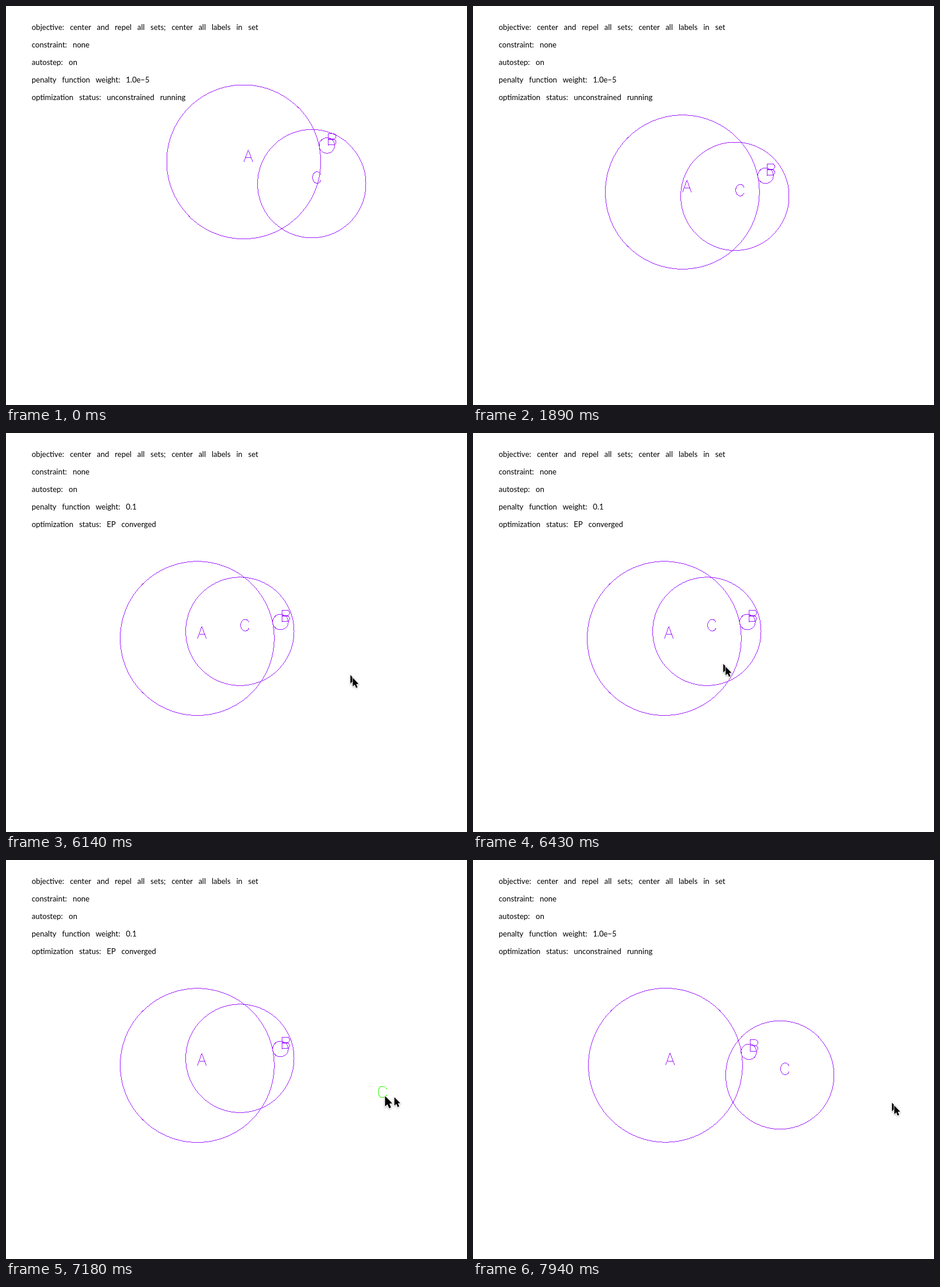
An HTML page with a canvas for the animation above (8000 ms loop, 789 px wide and 683 px high).

```html
<!DOCTYPE html>
<html lang="en">
<head>
<meta charset="utf-8">
<title>Set layout optimization</title>
<style>
  html, body { margin: 0; width: 100%; height: 100%; overflow: hidden; background: #fff; }
  canvas { position: absolute; left: 0; top: 0; }
  #status {
    position: absolute; left: 44px; top: 21px;
    font: 13px/30px Lato, sans-serif; color: #000;
    word-spacing: 6.6px; white-space: pre;
  }
</style>
</head>
<body>
<canvas id="stage" width="789" height="683"></canvas>
<div id="status"></div>
<script>
const LOOP = 8000, STEP = 58, RELAX = 7470;
const CONVERGED = 5370, ENTER = 5962, ARRIVE = 6542, GRAB = 6716, DROP = 7354, REST = 7586;
const PURPLE = '#a020ff', GREEN = '#33ff00';
const RADIUS = { A: 131.8, B: 13.3, C: 92.7 };
const ctx = document.getElementById('stage').getContext('2d');
const status = document.getElementById('status');

const mix = (a, b, f) => a + (b - a) * f;
const clamp = (v, lo, hi) => Math.min(hi, Math.max(lo, v));
const easeOut = (f, power) => 1 - (1 - f) ** power;

function arc(x, y, rx, ry, from, to) {
  return Array.from({ length: 17 }, (_, i) => {
    const a = mix(from, to, i / 16) * Math.PI / 180;
    return [x + rx * Math.cos(a), y + ry * Math.sin(a)];
  });
}

// single-stroke letters, 100 units high, y up
const bowl = y => [[11, y + 24], ...arc(54, y, 24, 24, 90, -90), [11, y - 24]];
const LETTERS = {
  A: [[[2, 0], [39, 100], [77, 0]], [[16, 33], [63, 33]]],
  B: [[[11, 0], [11, 100]], bowl(76), bowl(26)],
  C: [arc(45, 50, 38, 50, 31, 329)]
};
const ARROW = [[0, 0], [0, 17], [4, 13.5], [6.8, 20], [9.8, 18.6], [7.1, 12.4], [12, 12]];

const plot = (x, y) => ctx.fillRect(Math.floor(x), Math.floor(y), 1, 1);

// crisp one-pixel polyline
function trace(pts) {
  for (let i = 1; i < pts.length; i++) {
    const [x0, y0] = pts[i - 1], [x1, y1] = pts[i];
    const n = Math.max(1, Math.ceil(Math.max(Math.abs(x1 - x0), Math.abs(y1 - y0))));
    for (let k = 0; k <= n; k++) plot(mix(x0, x1, k / n), mix(y0, y1, k / n));
  }
}

function circle(x, y, r) {
  const reach = Math.ceil(r * Math.SQRT1_2);
  for (let d = -reach; d <= reach; d++) {
    const e = Math.sqrt(r * r - d * d);
    for (const side of [-e, e]) {
      plot(x + d, y + side);
      plot(x + side, y + d);
    }
  }
}

function letter(name, x, y) {
  for (const line of LETTERS[name]) {
    trace(line.map(([u, v]) => [x + u * 0.2, y - 0.5 - v * 0.2]));
  }
}

function arrow(x, y, scale) {
  ctx.save();
  ctx.translate(x, y);
  ctx.scale(scale, scale);
  ctx.beginPath();
  ARROW.forEach(([u, v]) => ctx.lineTo(u, v));
  ctx.closePath();
  ctx.shadowColor = 'rgba(0,0,0,0.3)';
  ctx.shadowBlur = 3;
  ctx.shadowOffsetY = 1;
  ctx.strokeStyle = '#fff';
  ctx.lineWidth = 2;
  ctx.stroke();
  ctx.shadowColor = 'transparent';
  ctx.fillStyle = '#000';
  ctx.fill();
  ctx.restore();
}

// share of the way from the first layout to the converged one
function settled(t) {
  if (t < 420) return 0;
  if (t < 1890) return 0.19;
  return t < CONVERGED ? 0.61 : 1;
}

// centres of the three sets; B keeps its distance to A
function layout(t, tick) {
  if (tick >= DROP) {
    const n = clamp((tick - RELAX) / STEP, -2, 2);
    const ax = 330.3 - 0.45 * n, ay = 351.3;
    return { A: [ax, ay], B: [ax + 142.6, ay - 23], C: [536 - 5.4 * n, 370 - n] };
  }
  const f = settled(t);
  const ax = mix(406.8, 327.3, f), ay = mix(266.8, 351.6, f);
  return { A: [ax, ay], B: [ax + 142.5, ay - 28], C: [mix(523.3, 400.3, f), mix(304.1, 339.6, f)] };
}

// approach, drag, then glide to rest
function pointer(tick) {
  const part = (from, to) => clamp((tick - from) / (to - from), 0, 1);
  if (tick < GRAB) {
    const f = easeOut(part(ENTER, ARRIVE), 2);
    return [mix(772, 414, f), mix(436, 393.5, f)];
  }
  if (tick < DROP) {
    const f = part(GRAB, DROP);
    return [mix(413, 685, easeOut(f, 1.55)), mix(336, 404, easeOut(f, 11))];
  }
  const f = part(DROP, REST);
  return [mix(685, 717, f), mix(406, 415.5, f)];
}

function statusText(running) {
  return [
    'objective: center and repel all sets; center all labels in set',
    'constraint: none',
    'autostep: on',
    'penalty function weight: ' + (running ? '1.0e\u22125' : '0.1'),
    'optimization status: ' + (running ? 'unconstrained running' : 'EP converged')
  ].join('\n');
}

function draw(t) {
  const tick = RELAX + Math.floor((t - RELAX) / STEP) * STEP;
  const dragging = tick >= GRAB && tick < DROP;
  const centres = layout(t, tick);
  const [px, py] = pointer(tick);

  const text = statusText(t < CONVERGED || tick >= DROP);
  if (status.textContent !== text) status.textContent = text;

  ctx.clearRect(0, 0, 789, 683);
  for (const name in centres) {
    const [x, y] = centres[name];
    const held = dragging && name === 'C';
    ctx.fillStyle = PURPLE;
    circle(x, y, RADIUS[name]);
    if (held) ctx.fillStyle = GREEN;
    letter(name, held ? px - 13 : x, held ? py + 3.5 : y);
  }
  if (tick >= ENTER) {
    arrow(px, py, dragging ? 1.05 : 0.85);
    arrow(px + (dragging ? 16 : 4), py + (dragging ? 2 : 5), 0.85);
  }
}

function loop(now) {
  draw(now % LOOP);
  requestAnimationFrame(loop);
}
draw(0);
requestAnimationFrame(loop);
</script>
</body>
</html>
```
